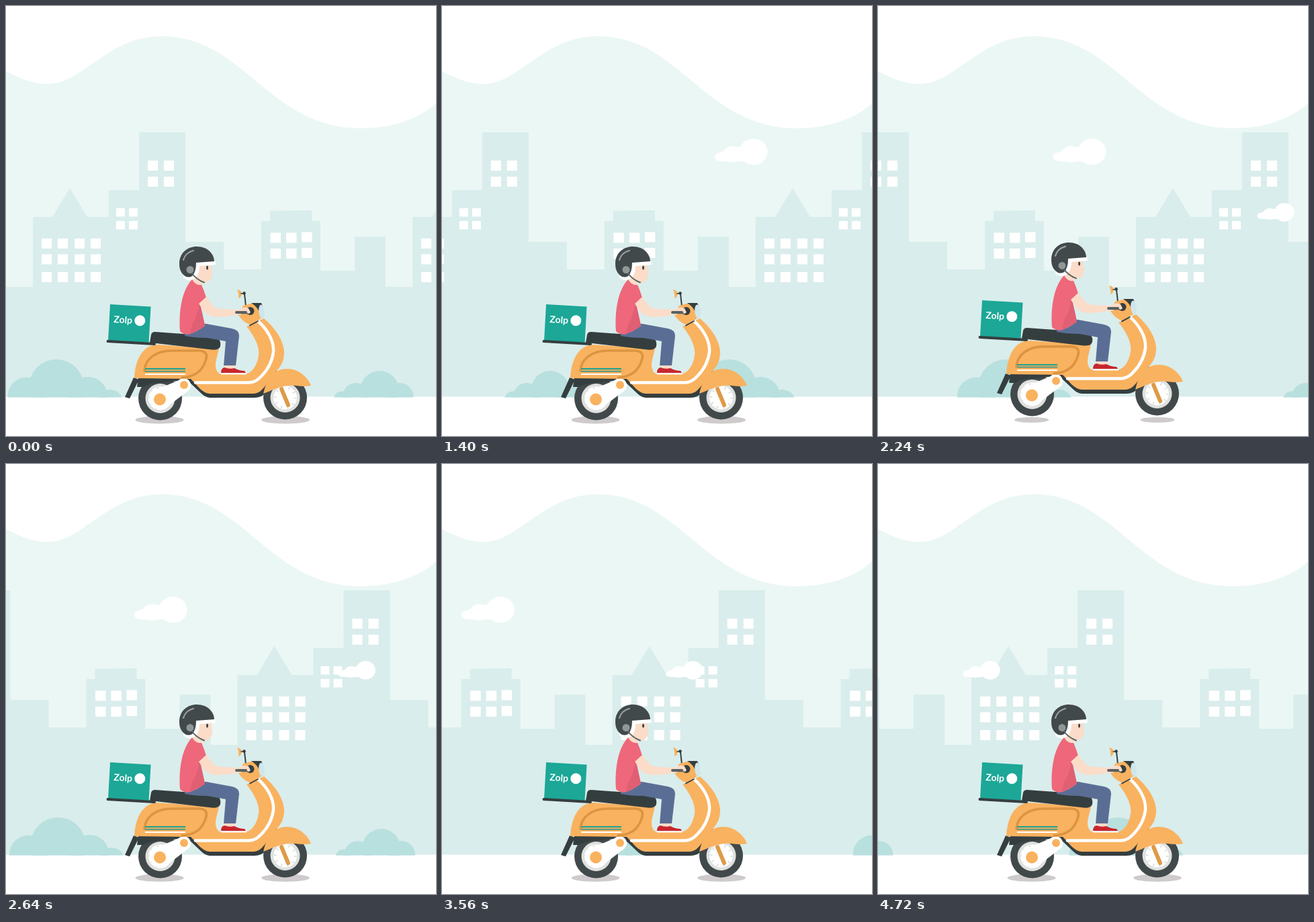
Write an HTML page that moves like this. It is 640 by 640 pixels and loops after 4760 ms.

```html
<!DOCTYPE html>
<html lang="en">
<head>
<meta charset="utf-8">
<title>Scooter delivery</title>
<style>
  html, body { margin: 0; width: 100%; height: 100%; overflow: hidden; background: #fff; }
  svg { display: block; width: 100vw; height: 100vh; }
  .city { fill: #d9edec; }
  .win { fill: #fff; }
  .bush { fill: #b8e0df; }
  .dark { fill: #353e3f; }
  .tyre { fill: #42494b; }
  .body { fill: #f9b25f; }
  .skin { fill: #fbdcc8; }
  .line { fill: none; stroke-linecap: round; stroke-linejoin: round; }
  .name { font: 700 14px Lato, sans-serif; fill: #fff; }
</style>
</head>
<body>
<svg viewBox="0 0 640 640">
  <defs>
    <clipPath id="land"><rect width="640" height="582.5"/></clipPath>

    <g id="block">
      <path class="city" d="M40 581.500V314H69L95 271 121 314H153V274H198V188H267V351H324V392H380V320H393V305L455 304V320H468V394H519V343.500H565V418H605.500V581.500Z"/>
      <g class="win" id="windows"></g>
    </g>

    <g id="cloud" fill="#fff">
      <ellipse cx="58" cy="0" rx="21" ry="19.500"/>
      <ellipse cx="27" cy="3.500" rx="14.500" ry="12"/>
      <ellipse cx="8.500" cy="7.500" rx="8.500" ry="6.500"/>
      <path d="M8 1 20-4 45-9V14L27 15 8 14Z"/>
    </g>

    <g id="big" class="bush">
      <circle cx="28" cy="581" r="28.500"/>
      <circle cx="72" cy="567" r="41"/>
      <circle cx="119" cy="581" r="29"/>
      <circle cx="152" cy="590" r="19"/>
    </g>
    <g id="small" class="bush">
      <circle cx="12" cy="586" r="12.500"/>
      <circle cx="33" cy="581" r="20"/>
      <circle cx="68" cy="571.500" r="28.500"/>
      <circle cx="98" cy="581.500" r="20.500"/>
    </g>

    <g id="wheel">
      <circle class="tyre" r="32.500"/>
      <circle r="22" fill="#dfe1df"/>
      <circle r="17.500" fill="#fff"/>
      <circle r="15" fill="none" stroke="#d5dbda" stroke-width="4" stroke-dasharray="1.5 7.92"/>
    </g>
  </defs>

  <path fill="#ebf7f4" d="M0 97C20 108 42 116 62 116C115 116 150 45 232 45C355 45 390 182 528 182C575 182 615 168 640 145V581H0Z"/>
  <g clip-path="url(#land)">
    <g id="city"></g>
    <g id="clouds">
      <use href="#cloud" transform="translate(522 217)"/>
      <use href="#cloud" transform="translate(826 307) scale(.7)"/>
    </g>
    <g id="bushes"></g>
  </g>

  <ellipse class="shade" cx="228.500" cy="616" rx="36" ry="5.800" fill="#cfcbcc"/>
  <ellipse class="shade" cx="416" cy="616" rx="36" ry="5.800" fill="#cfcbcc"/>

  <g id="ride">
    <!-- wheels -->
    <use href="#wheel" x="229.500" y="584"/>
    <use href="#wheel" x="415.500" y="583"/>
    <path class="line" d="M410 570 420 594" stroke="#de9a48" stroke-width="6"/>

    <!-- undercarriage -->
    <path class="dark" d="M190 553 198 556 184 584 177 582Z"/>
    <path class="dark" d="M197 552H276L289 569 303 576H368L383 565 403 540 402 552 386 576Q380 583 370 583H303Q296 582 291 577L272 559Q255 557 236 560 215 560 204 567H195Z"/>
    <path d="M217 574 257 557A10.500 10.500 0 0 1 272 572L243 594A16 16 0 1 1 217 574Z" fill="#fff"/>
    <circle class="body" cx="229" cy="585.500" r="9"/>
    <circle class="body" cx="265" cy="564" r="6"/>

    <!-- bodywork -->
    <path class="body" d="M191 554C192 532 200 506 224 504L317 510C314 524 310 533 313 541Q315 548 322 548H356C367 546 374 534 376 520C378 506 368 489 358 477L384 465C399 478 413 496 414 515C414 530 408 538 400 546C392 556 387 565 382 570Q376 577 368 577H303Q295 576 288 569L275 555Z"/>
    <path class="line" d="M374 468C389 481 399 498 398 515C396 530 388 543 380 551Q372 560 362 560.500H282" stroke="#fff" stroke-width="4.500" stroke-linecap="butt"/>
    <path class="line" d="M206 543C207 526 222 513 247 513H288C299 514 300 520 297 528C292 544 281 552 262 553" stroke="#dc9440" stroke-width="3.600"/>
    <g fill="none" stroke-width="2">
      <path d="M207 540H267" stroke="#1da191"/>
      <path d="M207 543.700H267" stroke="#4f9a80"/>
      <path d="M207 548H267" stroke="#fff"/>
    </g>
    <path class="body" d="M383 577C386 563 392 548 404 543Q410 540 418 540C437 540 450 554 454 565Q444 567 431 565C412 563 398 571 383 577Z"/>
    <path class="dark" d="M214 501 216 489Q217 485 222 485L304 491Q317 491 319 501 321 513 306 511.500Z"/>

    <!-- parcel -->
    <path d="M155 444 215.500 447.500 212.500 501 152 498Z" fill="#1ca797"/>
    <path class="line" d="M151.500 499 221 503" stroke="#353e3f" stroke-width="4"/>
    <g transform="translate(160 471) rotate(4)">
      <text class="name">Zolp</text>
      <circle cx="39" cy="-5.500" r="8" fill="#fff"/>
    </g>

    <!-- handlebar and lamp -->
    <path class="line" d="M357 447 355 429" stroke="#353e3f" stroke-width="2"/>
    <path class="body" d="M344 422Q350 423 351 428 350 434 346 435 347 428 344 422Z"/>
    <path class="line" d="M350 428H355" stroke="#353e3f" stroke-width="1.500"/>
    <circle class="dark" cx="354.500" cy="427.500" r="2.300"/>
    <path class="body" d="M346 460 353 446 368 442 378 445Q376 456 381 464L364 475Q352 470 346 460Z"/>
    <path class="dark" d="M365 442H380L382 447 377 455Q373 447 365 442Z"/>
    <ellipse cx="380.500" cy="455" rx="4.300" ry="10.500" transform="rotate(-6 380 455)" fill="#cfe6ea"/>
    <path class="line" d="M363 475.500 375 469" stroke="#353e3f" stroke-width="1.800"/>

    <!-- leg -->
    <path class="skin" d="M325 532H341V542H325Z"/>
    <path d="M320 546Q320 539 325 538 332 541 340 539 347 543 355 543L357 546Z" fill="#c8262d"/>
    <path class="line" d="M321 547.500H357" stroke="#fff" stroke-width="2"/>
    <path d="M266 488Q281 472 298 473L336 480Q347 482 347 491L342 535H324L327 499 300 494Q280 494 266 491Z" fill="#5a6e95"/>

    <!-- rider -->
    <path class="skin" d="M277 404 293 408 291 421 275 418Z"/>
    <path d="M277 407Q283 417 291 415 295 424 298 434L289 443 293 462 296 476Q285 485 271 489 262 488 259 484C257 456 261 424 277 407Z" fill="#ee677a"/>
    <path d="M288 442 292 457 296 475Q287 483 274 487L277 474Q286 459 288 442Z" fill="#e05f73"/>
    <circle class="dark" cx="363.500" cy="454" r="6"/>
    <path class="line" d="M343 456H361" stroke="#596163" stroke-width="4.500"/>
    <path class="skin" d="M287 443 298 433 309 447Q314 451 323 451L347 452Q354 446 361 450L364 456 361 458 354 454 349 460 340 458 341 461 315 463Q302 463 295 455Z"/>
    <path class="line" d="M343 456H357" stroke="#596163" stroke-width="4"/>

    <!-- head -->
    <path class="skin" d="M283 383H305L307 400Q305 411 296 412 286 411 281 403Z"/>
    <ellipse cx="299.500" cy="389.500" rx="1.400" ry="3" fill="#34383b"/>
    <path d="M264 399 281 381 311 379 312 385 288 387Q288 399 282 405 272 412 264 404Z" fill="#fff"/>
    <path class="tyre" d="M284 358C301 358 310 370 310 380L283 382Q283 396 277 402 270 406 264 400C258 394 258 387 258 382C259 367 270 358 284 358Z"/>
    <path class="line" d="M264 378Q267 367 279 364" stroke="#9aa1a2" stroke-width="2.200"/>
    <path class="line" d="M276 397Q283 407 295 411.500" stroke="#596163" stroke-width="2"/>
    <circle cx="274" cy="392.500" r="5.500" fill="#8f9797"/>
  </g>
</svg>

<script>
  const NS = "http://www.w3.org/2000/svg";
  const LOOP = 4760, STEP = 40;
  const byId = id => document.getElementById(id);

  function add(parent, tag, attrs) {
    const el = document.createElementNS(NS, tag);
    for (const key in attrs) el.setAttribute(key, attrs[key]);
    byId(parent).appendChild(el);
  }

  function panes(xs, ys, width, height) {
    for (const x of xs) for (const y of ys) add("windows", "rect", { x, y, width, height });
  }

  panes([53, 77, 102, 126], [346, 369.5, 396], 15, 15);
  panes([164, 183], [301, 320], 13, 12.5);
  panes([211, 235], [230, 254], 15, 15);
  panes([393.5, 417], [337.5, 361], 15.5, 15);
  panes([440], [336.5, 360], 15.5, 15);

  for (let i = -1; i < 3; i++) add("city", "use", { href: "#block", x: i * 565 });
  for (const x of [3, 750, 1616]) add("bushes", "use", { href: "#big", x });
  for (const x of [488, 1235]) add("bushes", "use", { href: "#small", x });

  const shades = [...document.querySelectorAll(".shade")];
  const shift = (id, x, y = 0) => byId(id).setAttribute("transform", `translate(${x} ${y})`);

  // One hop every 520 ms, at rest on the road in between
  function hop(t) {
    const d = (t % 520 - 160) / 112;
    return Math.abs(d) < 1 ? Math.cos(d * Math.PI / 2) : 0;
  }

  function draw(now) {
    const t = Math.floor(now % LOOP / STEP) * STEP;
    const drift = t - 720;
    const up = hop(t);
    shift("city", -0.0987 * t);
    shift("bushes", -0.282 * t);
    shift("clouds", -(0.1705 * drift + 1.1e-6 * drift * drift));
    shift("ride", 0, -6.1 * up);
    for (const s of shades) {
      s.setAttribute("rx", 36 - 10.3 * up);
      s.setAttribute("ry", 5.8 - 1.7 * up);
    }
  }

  let start;
  function tick(now) {
    start ??= now;
    draw(now - start);
    requestAnimationFrame(tick);
  }
  draw(0);
  requestAnimationFrame(tick);
</script>
</body>
</html>
```
